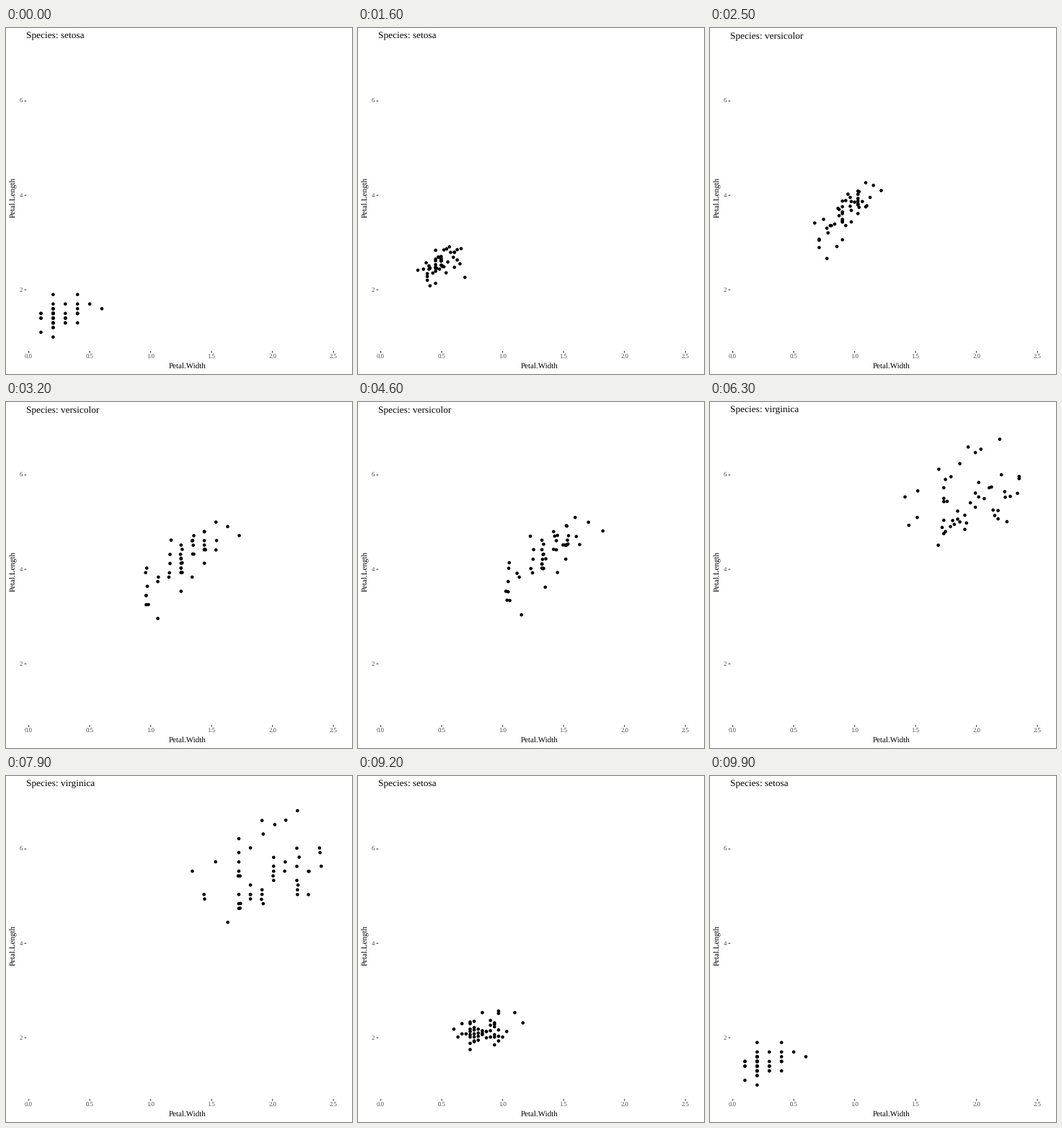
Recreate the animation shown at these times as a matplotlib script. Size 480x480 px, loop 10 s.

```python
import matplotlib.pyplot as plt
import numpy as np
from matplotlib.animation import FuncAnimation
from matplotlib.collections import EllipseCollection

SIZE, FRAMES, STEP = 480, 100, 100
X0, XS = 31.58, 169.05      # pixel of zero and pixels per unit
Y0, YS = 494.2, 65.5
LEFT, BOTTOM = 28.2, 448.0  # panel edges
TICK = 2.75
HOLD = 12

# Petal sizes in tenths, one list per species and measure
setosa_w = [2, 2, 2, 2, 2, 4, 3, 2, 2, 1, 2, 2, 1, 1, 2, 4, 4, 3, 3, 3,
            2, 4, 2, 5, 2, 2, 4, 2, 2, 2, 2, 4, 1, 2, 2, 2, 2, 1, 2, 2,
            3, 3, 2, 6, 4, 3, 2, 2, 2, 2]
setosa_l = [14, 14, 13, 15, 14, 17, 14, 15, 14, 15, 15, 16, 14, 11, 12, 15, 13,
            14, 17, 15, 17, 15, 10, 17, 19, 16, 16, 15, 14, 16, 16, 15, 15, 14,
            15, 12, 13, 14, 13, 15, 13, 13, 13, 16, 19, 14, 16, 14, 15, 14]
versicolor_w = [14, 15, 15, 13, 15, 13, 16, 10, 13, 14, 10, 15, 10, 14, 13, 14, 15,
                10, 15, 11, 18, 13, 15, 12, 13, 14, 14, 17, 15, 10, 11, 10, 12, 16,
                15, 16, 15, 13, 13, 13, 12, 14, 12, 10, 13, 12, 13, 13, 11, 13]
versicolor_l = [47, 45, 49, 40, 46, 45, 47, 33, 46, 39, 35, 42, 40, 47, 36, 44, 45,
                41, 45, 39, 48, 40, 49, 47, 43, 44, 48, 50, 45, 35, 38, 37, 39, 51,
                45, 45, 47, 44, 41, 40, 44, 46, 40, 33, 42, 42, 42, 43, 30, 41]
virginica_w = [25, 19, 21, 18, 22, 21, 17, 18, 18, 25, 20, 19, 21, 20, 24, 23, 18,
               22, 23, 15, 23, 20, 20, 18, 21, 18, 18, 18, 21, 16, 19, 20, 22, 15,
               14, 23, 24, 18, 18, 21, 24, 23, 19, 23, 25, 23, 19, 20, 23, 18]
virginica_l = [60, 51, 59, 56, 58, 66, 45, 63, 58, 61, 51, 53, 55, 50, 51, 53, 55,
               67, 69, 50, 57, 49, 67, 49, 57, 60, 48, 49, 56, 58, 61, 64, 56, 51,
               56, 61, 56, 55, 48, 54, 56, 51, 51, 59, 57, 52, 50, 52, 54, 51]


def px(x):
    return X0 + XS * x


def py(y):
    return Y0 - YS * y


def state(name, w, l):
    return name, px(np.array(w) / 10), py(np.array(l) / 10)


STATES = [state("setosa", setosa_w, setosa_l),
          state("versicolor", versicolor_w, versicolor_l),
          state("virginica", virginica_w, virginica_l)]
MOVES = [22, 22, 21]


def bounce_out(p):
    if p < 4 / 11:
        return 121 * p * p / 16
    if p < 8 / 11:
        return 363 / 40 * p * p - 99 / 10 * p + 17 / 5
    if p < 9 / 10:
        return 4356 / 361 * p * p - 35442 / 1805 * p + 16061 / 1805
    return 54 / 5 * p * p - 513 / 25 * p + 268 / 25


def pose(frame):
    """Title and point positions; 101 timeline steps are sampled by 100 frames."""
    j = frame + (frame >= FRAMES // 2)
    for s, n in enumerate(MOVES):
        if j < HOLD + n:
            break
        j -= HOLD + n
    k = max(0, j - HOLD + 1)
    name, xa, ya = STATES[s]
    nxt, xb, yb = STATES[(s + 1) % 3]
    t = k / n
    x = xa + (xb - xa) * t
    y = ya + (yb - ya) * bounce_out(t)
    return (nxt if k > (n + 1) // 2 else name), np.column_stack([x, y])


plt.rcParams.update({"font.family": "Liberation Serif", "text.hinting": "none"})
fig = plt.figure(figsize=(SIZE / 72, SIZE / 72), dpi=72, facecolor="white")
ax = fig.add_axes([0, 0, 1, 1])
ax.set(xlim=(0, SIZE), ylim=(SIZE, 0))
ax.axis("off")


def label(x, y, s, size, color="black", **kw):
    return ax.text(x, y, s, fontsize=size, color=color, va="baseline", **kw)


def tick(xs, ys):
    ax.plot(xs, ys, color="#333333", lw=1.07, solid_capstyle="butt", snap=False)


for v in np.arange(0, 2.6, 0.5):
    tick([px(v)] * 2, [BOTTOM, BOTTOM + TICK])
    label(px(v), 459, f"{v:.1f}", 8.8, "#4d4d4d", ha="center")
for v in (2, 4, 6):
    tick([LEFT - TICK, LEFT], [py(v)] * 2)
    label(23.4, py(v) + 3, str(v), 8.8, "#4d4d4d", ha="right")

label(251.4, 472, "Petal.Width", 11, ha="center")
label(13, 235.2, "Petal.Length", 11, ha="center", rotation=90, rotation_mode="anchor")
title = label(28, 14, "", 13.4)

diam = np.full(50, 4.62)
dots = EllipseCollection(diam, diam, np.zeros(50), units="points",
                         offsets=pose(0)[1], offset_transform=ax.transData,
                         facecolor="black", edgecolor="none", linewidth=0)
ax.add_collection(dots, autolim=False)


def draw(frame):
    name, points = pose(frame)
    title.set_text(f"Species: {name}")
    dots.set_offsets(points)
    return title, dots


anim = FuncAnimation(fig, draw, frames=FRAMES, interval=STEP, repeat=True,
                     repeat_delay=0, blit=False)
plt.show()
```
